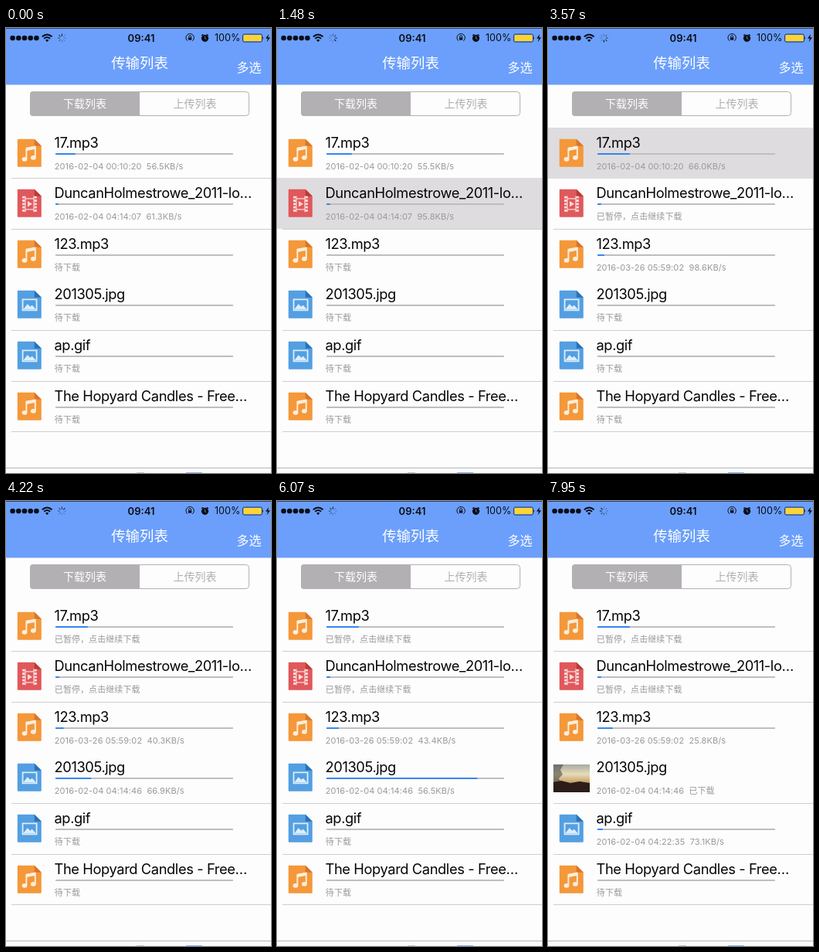
Write an HTML page that moves like this. It is 343 px wide and 576 px high and loops after 8 s.

```html
<!DOCTYPE html>
<html lang="zh-CN">
<head>
<meta charset="utf-8">
<title>传输列表</title>
<style>
html, body { margin: 0; width: 100%; height: 100%; overflow: hidden; background: #fdfdfd; }
svg { display: block; position: absolute; left: 0; top: 0; }
text { font-family: Inter, "Noto Sans CJK SC", sans-serif; white-space: pre; }
.mid { text-anchor: middle; }
.name { font-size: 18.3px; letter-spacing: -.4px; fill: #050506; }
.note { font-size: 11px; letter-spacing: .08px; fill: #9a989b; }
</style>
</head>
<body>
<svg id="stage" width="343" height="576" viewBox="0 0 343 576">
  <defs>
    <linearGradient id="sky" x1="0" y1="0" x2="0" y2="1">
      <stop offset="0" stop-color="#a9a9a2"/>
      <stop offset=".35" stop-color="#e6dcb8"/>
      <stop offset=".65" stop-color="#c7a065"/>
      <stop offset="1" stop-color="#4a3426"/>
    </linearGradient>
    <g id="music" fill="none" stroke="#fdeedb">
      <path d="M11.6 25.5V12L23 9.8V23.5" stroke-width="1.9"/>
      <path d="M11.6 13.2L23 11" stroke-width="4"/>
      <g fill="#fdeedb" stroke="none">
        <ellipse cx="9.2" cy="26" rx="3.4" ry="2.9"/>
        <ellipse cx="20.6" cy="24" rx="3.4" ry="2.9"/>
      </g>
    </g>
    <g id="film" fill="none" stroke="#fbdcdc">
      <path d="M8 9V29M23.4 9V29" stroke-width="3.4" stroke-dasharray="2.8 1.5"/>
      <path d="M10.2 8.6V29.4M21.2 8.6V29.4M10 12H21.4M10 26H21.4" stroke-width="1.2"/>
      <path d="M13.2 15.3L19.2 19L13.2 22.7Z" fill="#fbdcdc" stroke="none"/>
    </g>
    <g id="image" fill="none" stroke="#dceefc" stroke-width="1.8">
      <path d="M6.8 11.5H24.8V25.5H6.8Z"/>
      <path d="M7.5 24.5L13 17.5L16.5 21L19 19L24 24.5Z" fill="#dceefc" stroke="none"/>
    </g>
  </defs>

  <rect width="343" height="576" fill="#fdfdfd"/>
  <rect width="343" height="73.5" fill="#6b9ffb"/>
  <rect width="343" height="1" fill="#2f4570"/>

  <g id="status" fill="#0b0d14">
    <g id="dots"></g>
    <g fill="none" stroke="#0b0d14" stroke-width="1.9">
      <path d="M46.8 11.2Q53.2 5.6 59.6 11.2"/>
      <path d="M49.3 13.8Q53.2 10.4 57.1 13.8"/>
    </g>
    <path d="M51 15.7Q53.2 13.9 55.4 15.7L53.2 18Z"/>
    <g id="spinner" transform="translate(72.4 13)"></g>
    <text class="mid" x="175" y="17.5" font-size="13" font-weight="600">09:41</text>
    <g fill="none" stroke="#0b0d14">
      <path d="M234.8 16.6A5.2 5.2 0 1 1 241.2 16.8" stroke-width="1"/>
      <path d="M236.7 12.5V11A1.4 1.4 0 0 1 239.5 11V12.5" stroke-width=".9"/>
    </g>
    <rect x="235.9" y="12.2" width="4.4" height="3.4" rx=".5"/>
    <circle cx="257.5" cy="13.3" r="4.6"/>
    <path d="M253.2 9.8L255.3 8.2M261.8 9.8L259.7 8.2" stroke="#0b0d14" stroke-width="1.4"/>
    <path d="M257.5 10.7V13.5L259.3 14.4" fill="none" stroke="#6b9ffb" stroke-width=".8"/>
    <text x="270" y="17.4" font-size="12.6">100%</text>
    <rect x="306.5" y="8" width="25" height="10" rx="2" fill="none" stroke="#0b0d14" stroke-width=".7"/>
    <rect x="307.4" y="8.9" width="23.2" height="8.2" rx="1" fill="#fdd435"/>
    <path d="M332.4 11V15Q334 13 332.4 11Z"/>
    <path d="M340 8L336 13.6H338.8L337.7 18L342 12.2H339.2Z"/>
  </g>

  <g fill="#fff">
    <text class="mid" x="173" y="52.3" font-size="18.4">传输列表</text>
    <text x="298.5" y="57" font-size="16">多选</text>
  </g>

  <rect x="31.5" y="82.5" width="283" height="31" rx="4" fill="#fdfdfd" stroke="#b3b0b3"/>
  <path d="M173 82H35Q31 82 31 86V110Q31 114 35 114H173Z" fill="#b3b0b3"/>
  <g font-size="14">
    <text class="mid" x="102" y="103.3" fill="#fff">下载列表</text>
    <text class="mid" x="244.5" y="103.3" fill="#b1aeb1">上传列表</text>
  </g>

  <g id="rows"></g>

  <rect y="570" width="343" height="6" fill="#fafafa"/>
  <rect y="569" width="343" height="1" fill="#b9b7ba"/>
  <path d="M169 575.5H179" stroke="#c9c7ca"/>
  <path d="M233 575.5H254" stroke="#8fb4f3"/>
</svg>
<script>
const LOOP = 8000, PITCH = 65.65, BAR_X = 64, BAR_END = 294, SPOKES = 8;
const PAUSED = '已暂停，点击继续下载', WAITING = '待下载';
const $ = id => document.getElementById(id);

function add(parent, tag, attrs = {}, text = '') {
  const el = document.createElementNS('http://www.w3.org/2000/svg', tag);
  for (const key in attrs) el.setAttribute(key, attrs[key]);
  el.textContent = text;
  return parent.appendChild(el);
}

const KINDS = {
  music: ['#f4983a', '#d8752c'],
  film: ['#e0585b', '#b83c35'],
  image: ['#539fe1', '#2b71b8']
};

// bar: [time, right edge]; notes: [time, caption], a bare number is a speed in KB/s
const FILES = [
  { name: '17.mp3', kind: 'music', date: '2016-02-04 00:10:20',
    bar: [[0, 90], [1480, 97], [2870, 103], [3570, 106]],
    notes: [[0, 56.5], [950, 55.5], [1900, 69.8], [3340, 66], [3650, PAUSED]], tap: [3400, 3650] },
  { name: 'DuncanHolmestrowe_2011-lo…', kind: 'film', date: '2016-02-04 04:14:07',
    bar: [[0, 68], [1480, 69]],
    notes: [[0, 61.3], [1010, 95.8], [1560, PAUSED]], tap: [1330, 1560] },
  { name: '123.mp3', kind: 'music', date: '2016-03-26 05:59:02',
    bar: [[1650, 64], [2870, 70], [3570, 73], [5020, 77], [6070, 80], [7950, 84]],
    notes: [[0, WAITING], [1650, 98.6], [4160, 40.3], [5400, 43.4], [6770, 25.8]] },
  { name: '201305.jpg', kind: 'image', date: '2016-02-04 04:14:46', done: 6600,
    bar: [[3720, 64], [5020, 184], [6070, 259.5], [6560, 294]],
    notes: [[0, WAITING], [3720, 66.9], [5880, 56.5], [6600, '2016-02-04 04:14:46  已下载']] },
  { name: 'ap.gif', kind: 'image', date: '2016-02-04 04:22:35',
    bar: [[6850, 64], [7950, 71]],
    notes: [[0, WAITING], [6850, 73.1]] },
  { name: 'The Hopyard Candles - Free…', kind: 'music', bar: [[0, 64]], notes: [[0, WAITING]] }
];

function drawIcon(parent, kind) {
  const [body, fold] = KINDS[kind];
  const icon = add(parent, 'g', { transform: 'translate(14.8 143.8)' });
  add(icon, 'path', { d: 'M1 0H22L31 9V35Q31 36 30 36H1Q0 36 0 35V1Q0 0 1 0Z', fill: body });
  add(icon, 'path', { d: 'M22 0L31 9H22Z', fill: fold });
  add(icon, 'use', { href: '#' + kind });
  return icon;
}

function drawThumb(parent) {
  const thumb = add(parent, 'g', { transform: 'translate(7 145)' });
  add(thumb, 'rect', { width: 47, height: 36, fill: 'url(#sky)' });
  add(thumb, 'path', { d: 'M0 0H13L9 7L12 13L7 18L10 24H0Z', fill: '#4b4a48', opacity: .6 });
  add(thumb, 'path', { d: 'M0 23L10 21L22 24L34 22L47 24V36H0Z', fill: '#2c1d1a' });
  return thumb;
}

function buildRow(file, i) {
  if (i !== 2) {
    add($('rows'), 'rect', { x: 7, y: Math.floor(194.5 + PITCH * i), width: 336, height: 1, fill: '#cfcdd0' });
  }
  const row = add($('rows'), 'g', { transform: `translate(0 ${Math.floor(PITCH * i)})` });
  file.glow = add(row, 'rect', { y: 129, width: 343, height: 66, fill: '#dedcdf' });
  file.icon = drawIcon(row, file.kind);
  if (file.done) file.thumb = drawThumb(row);
  add(row, 'text', { class: 'name', x: 62.5, y: 154.5 }, file.name);
  file.track = add(row, 'g');
  add(file.track, 'rect', { x: BAR_X, y: 162, width: BAR_END - BAR_X, height: 2, rx: .8, fill: '#bfbdc0' });
  file.fill = add(file.track, 'rect', { x: BAR_X, y: 162, height: 2, rx: .8, fill: '#3486ee' });
  file.note = add(row, 'text', { class: 'note', x: 62.8, y: 182.6 });
}

function valueAt(keys, t) {
  const next = keys.findIndex(k => k[0] > t);
  if (next === 0) return keys[0][1];
  if (next < 0) return keys[keys.length - 1][1];
  const [t0, a] = keys[next - 1], [t1, b] = keys[next];
  return a + (b - a) * (t - t0) / (t1 - t0);
}

function captionAt(file, t) {
  const note = file.notes.filter(n => n[0] <= t).pop()[1];
  return typeof note === 'number' ? `${file.date}  ${note.toFixed(1)}KB/s` : note;
}

function glowAt(tap, t) {
  if (!tap || t < tap[0]) return 0;
  return Math.max(0, 1 - Math.max(0, t - tap[1]) / 200);
}

const show = (el, on) => el.setAttribute('visibility', on ? 'visible' : 'hidden');

function render(t) {
  for (const file of FILES) {
    file.fill.setAttribute('width', valueAt(file.bar, t) - BAR_X);
    file.glow.setAttribute('opacity', glowAt(file.tap, t));
    const caption = captionAt(file, t);
    if (file.note.textContent !== caption) file.note.textContent = caption;
    if (file.done) {
      const done = t >= file.done;
      show(file.thumb, done);
      show(file.icon, !done);
      show(file.track, !done);
    }
  }
  const head = Math.floor(t / 1000 * SPOKES) % SPOKES;
  spokes.forEach((spoke, i) =>
    spoke.setAttribute('opacity', Math.max(.25, 1 - (head - i + SPOKES) % SPOKES / 6)));
}

for (let i = 0; i < 5; i++) add($('dots'), 'circle', { cx: 8.6 + 7.7 * i, cy: 13, r: 3.3 });
const spokes = Array.from({ length: SPOKES }, (_, i) =>
  add($('spinner'), 'path', { d: 'M0 -2.5V-5.5', stroke: '#0b0d14', transform: `rotate(${i * 360 / SPOKES})` }));
FILES.forEach(buildRow);

const start = performance.now();
function tick() {
  render((performance.now() - start) % LOOP);
  requestAnimationFrame(tick);
}
tick();
</script>
</body>
</html>
```
